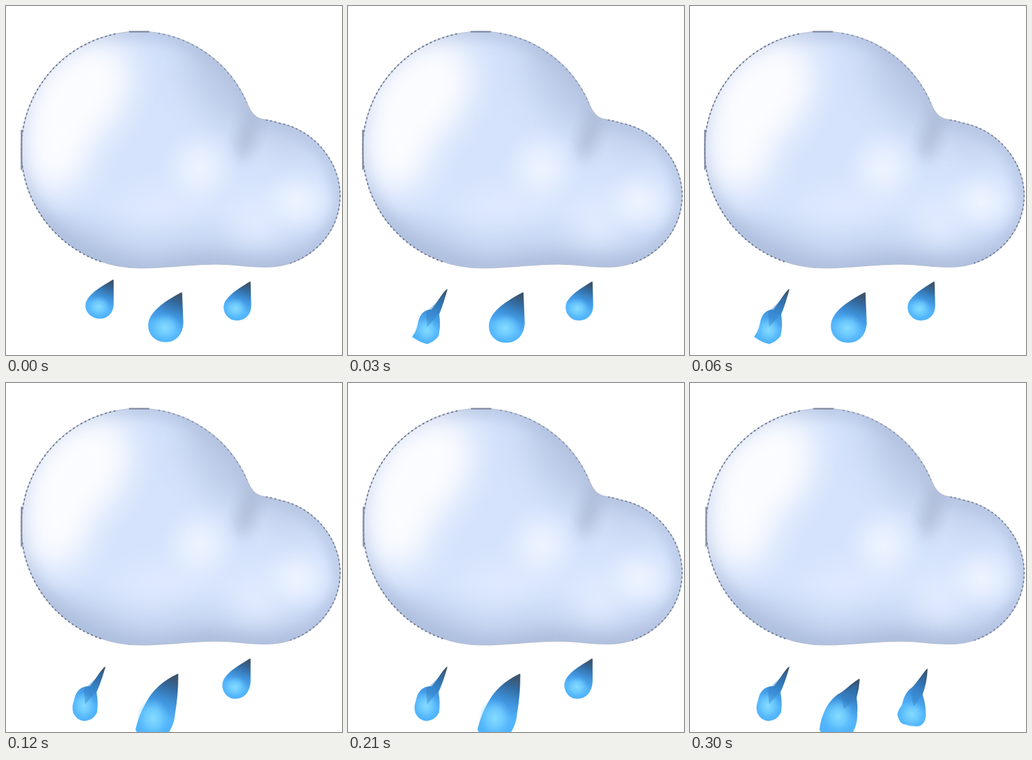
Recreate the animation shown at these times as an HTML page. Size 530 px wide and 550 px high, loop 0.33 s.

```html
<!DOCTYPE html>
<html lang="en">
<head>
<meta charset="utf-8">
<title>Rain cloud</title>
<style>
  html, body { margin: 0; width: 100%; height: 100%; overflow: hidden; background: #fff; }
  svg { position: absolute; left: 0; top: 0; display: block; }
</style>
</head>
<body>
<svg width="530" height="550" viewBox="0 0 530 550">
  <defs>
    <path id="shape" d="M210 40 A186 186 0 0 1 382 157 Q389 174 401 177.500 Q415 180 431 184.500 C488 196 527 247 527 299 C527 361 476 411.500 410 411.500 C375 411.500 365 407 330 407 C290 407 255 413 213 413 A187 187 0 0 1 24 226 A186 186 0 0 1 210 40Z"/>
    <clipPath id="inside"><use href="#shape"/></clipPath>
    <filter id="soft" x="-80%" y="-80%" width="260%" height="260%" color-interpolation-filters="sRGB"><feGaussianBlur stdDeviation="25"/></filter>
    <filter id="mild" x="-80%" y="-80%" width="260%" height="260%" color-interpolation-filters="sRGB"><feGaussianBlur stdDeviation="12"/></filter>
    <linearGradient id="body" x1="0" y1="0" x2="0" y2="1">
      <stop offset="0" stop-color="#d3e1fb"/>
      <stop offset=".75" stop-color="#d6e4fd"/>
      <stop offset="1" stop-color="#c0d0ee"/>
    </linearGradient>
    <radialGradient id="spot">
      <stop offset="0" stop-color="#edf4ff"/>
      <stop offset=".4" stop-color="#e8f0ff" stop-opacity=".8"/>
      <stop offset="1" stop-color="#dce8fd" stop-opacity="0"/>
    </radialGradient>
    <linearGradient id="water" x1=".65" y1="0" x2=".4" y2="1">
      <stop offset="0" stop-color="#3c556f"/>
      <stop offset=".16" stop-color="#33699d"/>
      <stop offset=".42" stop-color="#3f93dc"/>
      <stop offset=".7" stop-color="#54b5fb"/>
      <stop offset="1" stop-color="#4fb3fb"/>
    </linearGradient>
    <radialGradient id="shine">
      <stop offset="0" stop-color="#86dcff"/>
      <stop offset=".5" stop-color="#74d0ff" stop-opacity=".75"/>
      <stop offset="1" stop-color="#62c2ff" stop-opacity="0"/>
    </radialGradient>
  </defs>

  <g id="cloud">
    <g clip-path="url(#inside)">
      <use href="#shape" fill="url(#body)"/>
      <g filter="url(#soft)">
        <ellipse cx="335" cy="120" rx="40" ry="85" fill="#bccbe7" transform="rotate(-32 335 120)"/>
        <ellipse cx="435" cy="205" rx="60" ry="24" fill="#bfcde9" transform="rotate(18 435 205)"/>
        <ellipse cx="370" cy="416" rx="125" ry="18" fill="#a8bada"/>
        <ellipse cx="130" cy="392" rx="115" ry="27" fill="#b1c3e2" transform="rotate(28 130 392)"/>
      </g>
      <use href="#shape" fill="none" stroke="#a9b9d8" stroke-width="16" filter="url(#mild)"/>
      <g filter="url(#soft)" fill="#fbfcff">
        <ellipse cx="111" cy="143" rx="72" ry="104" transform="rotate(40 111 143)"/>
        <ellipse cx="78" cy="222" rx="54" ry="70"/>
      </g>
      <g filter="url(#soft)" fill="#e4eeff">
        <ellipse cx="395" cy="342" rx="42" ry="34"/>
        <ellipse cx="245" cy="315" rx="70" ry="24" opacity=".75" transform="rotate(-14 245 315)"/>
      </g>
      <ellipse cx="381" cy="202" rx="11" ry="42" fill="#a8b6d1" transform="rotate(17 381 202)" filter="url(#mild)"/>
      <ellipse cx="305" cy="256" rx="66" ry="70" fill="url(#spot)"/>
      <ellipse cx="459" cy="309" rx="66" ry="56" fill="url(#spot)"/>
    </g>
    <g fill="none" stroke-width="2">
      <use href="#shape" stroke="#b1bcd1" stroke-width="1.200"/>
      <path d="M150 403 A187 187 0 0 1 24 226 A186 186 0 0 1 175 43.500" stroke="#68748f" stroke-dasharray="3 4"/>
      <path d="M240 43 A186 186 0 0 1 380 153" stroke="#8795b1" stroke-dasharray="3 5"/>
      <path d="M410 179.500 Q420 181 431 184.500 C488 196 527 247 527 299 C527 349 493 390 448 405.500" stroke="#74809b" stroke-dasharray="3 4"/>
      <path d="M194 40.500 H226 M24.500 195 V258" stroke="#848fa5" stroke-width="2.500"/>
    </g>
  </g>
  <g id="rain"></g>
</svg>
<script>
const NS = "http://www.w3.org/2000/svg";
const LOOP = 330;
const cloud = document.getElementById("cloud");
const rain = document.getElementById("rain");

// outline, shine [x, y, rx, ry], optional fold
const drops = {
  leftRound: ["M169 432 C157 439 126 455 126 472 C126 483 136 492 148 492 C160 492 169 483 169 470Z", [146, 474, 19, 17]],
  leftCut: ["M156 447 C147 455 142 468 132 479 C119 479 113 488 111 501 Q109 513 102 521 Q113 529 125 532 Q136 528 142 520 Q146 504 143 486 C148 475 152 460 156 447Z", [124, 511, 19, 20], "M154 452 L123 483 L125 506 L142 486Z"],
  leftLong: ["M156 448 C147 456 142 469 132 479 C118 478 110 487 108 501 Q104 510 107 520 Q112 531 124 532 Q137 531 143 519 Q145 504 142 487 C148 475 152 460 156 448Z", [123, 509, 19, 22], "M154 453 L123 483 L125 506 L142 486Z"],
  midRound: ["M277 452 C260 461 225 480 225 503 C225 519 237 529 252 529 C267 529 278 518 279 500Z", [251, 507, 26, 23]],
  midWide: ["M276 452 C259 461 223 480 223 504 C223 520 235 530 249 530 C265 530 277 519 278 500Z", [248, 508, 26, 23]],
  midTall: ["M271 459 C252 468 232 483 221 505 Q210 525 205 546 L208 552 H255 Q265 538 266 520 Q271 492 271 459Z", [232, 528, 26, 31]],
  midBent: ["M267 467 C253 475 246 485 234 491 C216 504 207 527 205 546 L208 552 H255 Q264 538 263 520 Q264 509 262 496 Q266 482 267 467Z", [234, 525, 25, 28], "M265 472 L238 493 L243 514 L261 496Z"],
  rightRound: ["M385 435 C373 443 344 458 344 474 C344 486 353 495 364 495 C377 495 386 486 386 472Z", [362, 477, 19, 17]],
  rightLow: ["M385 435 C373 443 342 458 342 476 C342 488 351 497 361 497 C375 497 384 487 385 471Z", [361, 479, 19, 17]],
  rightLong: ["M374 451 C365 462 358 474 350 481 C340 488 337 499 335 508 Q328 517 328 523 Q331 536 338 537 Q350 541 361 540 Q370 537 371 526 Q372 508 366 491 Q373 472 374 451Z", [350, 522, 22, 21], "M372 457 L348 487 L353 510 L366 491Z"]
};

// start ms, left edge of the cloud, visible drops
const poses = [
  [0, 24, ["leftRound", "midRound", "rightRound"]],
  [30, 23, ["leftCut", "midWide", "rightRound"]],
  [120, 24, ["leftLong", "midTall", "rightLow"]],
  [270, 25, ["leftLong", "midBent", "rightLong"]]
];

function add(parent, tag, attrs) {
  const el = document.createElementNS(NS, tag);
  for (const key in attrs) el.setAttribute(key, attrs[key]);
  return parent.appendChild(el);
}

function makeDrop(name) {
  const [d, [cx, cy, rx, ry], fold] = drops[name];
  const g = add(rain, "g", {});
  const water = "url(#water)";
  add(g, "path", { d, fill: water, stroke: water, "stroke-width": 1.6, "stroke-linejoin": "round" });
  add(g, "ellipse", { cx, cy, rx, ry, fill: "url(#shine)" });
  if (fold) add(g, "path", { d: fold, fill: "#2f78bd", opacity: 0.4 });
  return g;
}

const nodes = {};
for (const name in drops) nodes[name] = makeDrop(name);

let shown = null;
function draw(now) {
  const t = now % LOOP;
  const pose = poses.findLast(p => p[0] <= t);
  if (pose === shown) return;
  shown = pose;
  const [, left, visible] = pose;
  // the right edge stays put while the left one breathes
  const sx = (527 - left) / 503;
  cloud.setAttribute("transform", `matrix(${sx} 0 0 1 ${527 * (1 - sx)} 0)`);
  for (const name in nodes) nodes[name].style.display = visible.includes(name) ? "" : "none";
}

const start = performance.now();
function tick() {
  draw(Math.max(0, performance.now() - start));
  requestAnimationFrame(tick);
}
tick();
</script>
</body>
</html>
```
